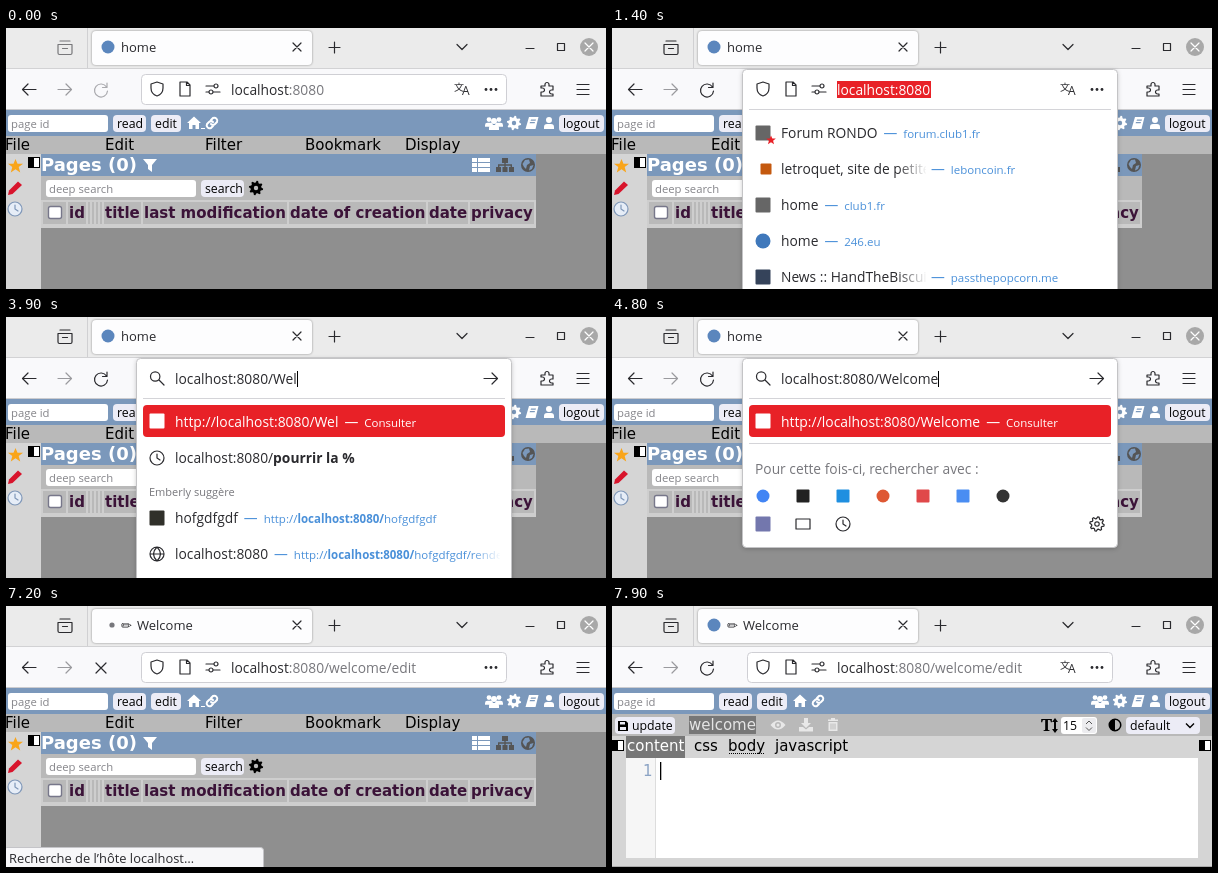
These frames come from a looping animation (600x261 px, 8 s). An HTML page:

```html
<!DOCTYPE html>
<html lang="en">
<head>
<meta charset="utf-8">
<title>Browser demo</title>
<style>
html, body { margin: 0; width: 100%; height: 100%; overflow: hidden; }
svg { display: block; width: 600px; height: 261px; }
text { white-space: pre; font-family: "Open Sans", "Noto Sans", sans-serif; }
.page { font-family: "DejaVu Sans", sans-serif; }
.bold { font-weight: bold; }
.popup { filter: drop-shadow(0 1px 2px #0003); }
.tab { filter: drop-shadow(0 0 1px #0006); }
</style>
</head>
<body>
<svg id="stage" viewBox="0 0 600 261"></svg>
<script>
const stage = document.getElementById('stage');
const LOOP = 8000, STEP = 100;
const INK = '#2a2a2e', GREY = '#77777c', LINK = '#4a90d9', RED = '#e82127';
const BLUE = '#7b98bb', MENU = '#b9b9b9', SIDE = '#d5d5d5';

const RING = 'M-7 0a7 7 0 1 0 14 0a7 7 0 1 0-14 0';
// Outline of a cog with eight teeth.
const COG = 'M' + Array.from({ length: 32 }, (_, i) => {
  const a = (i + .5) * Math.PI / 16, r = i % 4 < 2 ? 7.2 : 5.4;
  return `${(r * Math.cos(a)).toFixed(2)} ${(r * Math.sin(a)).toFixed(2)}`;
}).join('L') + 'Z';
const LINES = {
  view: 'M-5-6.5H5M-7-3H7V5.500Q7 7 5.500 7H-5.500Q-7 7-7 5.500ZM-2.500 1H2.500',
  cross: 'M-4-4L4 4M4-4L-4 4',
  stop: 'M-5-5L5 5M5-5L-5 5',
  plus: 'M-5.5 0H5.5M0-5.5V5.5',
  down: 'M-5-2.5L0 2.5L5-2.5',
  min: 'M-4 2H4',
  max: 'M-3.5-3.5H3.5V3.5H-3.5Z',
  back: 'M7 0H-6M-1-5.5L-6.5 0L-1 5.5',
  next: 'M-7 0H6M1-5.5L6.5 0L1 5.5',
  reload: 'M5.5-3A6.5 6.5 0 1 0 6.5 1M6-7V-2.5H1.5',
  shield: 'M0-7L6-5V-1Q6 5 0 7Q-6 5-6-1V-5Z',
  doc: 'M-5-7H2L5-4V7H-5ZM1.5-7V-3.5H5',
  perm: 'M-7-3H1M1-3a2 2 0 1 0 4 0a2 2 0 1 0-4 0M-7 3H-4M-4 3a2 2 0 1 0 4 0a2 2 0 1 0-4 0M0 3H7',
  search: 'M-6.5-1.5a4.7 4.7 0 1 0 9.4 0a4.7 4.7 0 1 0-9.4 0M2 2L7 7',
  clock: RING + 'M0-4V0L3 2',
  globe: RING + 'M-7 0H7M0-7Q-7 0 0 7Q7 0 0-7',
  menu: 'M-6-5H6M-6 0H6M-6 5H6',
  puzzle: 'M-6-3H-2V-4.5a2 2 0 0 1 4 0V-3H6V1H4.5a2 2 0 0 0 0 4H6V7H-6V3H-4.5a2 2 0 0 0 0-4H-6Z',
  link: 'M-1-3L1-5a3 3 0 0 1 4 4L3 1a3 3 0 0 1-4 0M1 3L-1 5a3 3 0 0 1-4-4L-3-1a3 3 0 0 1 4 0',
  tabs: 'M-7-5H7V5H-7Z',
  cog: COG + 'M-2.2 0a2.2 2.2 0 1 0 4.4 0a2.2 2.2 0 1 0-4.4 0'
};
const SOLIDS = {
  star: 'M0-7L2-2.3H7.5L3.2 1L4.7 6.5L0 3.3L-4.7 6.5L-3.2 1L-7.5-2.3H-2Z',
  pencil: 'M-7 7L-6 2.5L3-6.5L7-3L-2.5 6Z',
  house: 'M0-6.5L7 0H5V6H1.5V2H-1.5V6H-5V0H-7Z',
  funnel: 'M-7-6H7L2 0V7L-2 4V0Z',
  list: [-7, -2, 3].map(y => `M-9 ${y}h5v4h-5zM-3 ${y}h12v4h-12z`).join(''),
  tree: 'M-3-7H3V-2H-3ZM-9 2H-4V7H-9ZM-2.5 2H2.5V7H-2.5ZM4 2H9V7H4ZM-7-.7H7V.7H-7ZM-.7-2H.7V-.7H-.7ZM-.7 .7H.7V2H-.7ZM-7 .7H-5.6V2H-7ZM5.6 .7H7V2H5.6Z',
  earth: RING + 'M-5.5-1L-3-5L1-5.5L2-2L-1 0L-2 4L-4 2ZM2 1L5.5 0L4 4L1 5.5Z',
  book: 'M-3-6H6.5L3.5 6H-6.5ZM-1-3.5L-1.4-2.3H3.6L4-3.5ZM-2-1L-2.4 .2H2.6L3-1Z',
  user: 'M-3-3a3 3 0 1 0 6 0a3 3 0 1 0-6 0M-5 6V4Q-5 1-2 1H2Q5 1 5 4V6Z',
  trash: 'M-5-5.5H-2V-7H2V-5.5H5V-4H-5ZM-4.5-3H4.5V6H-4.5ZM-2.5-1.5V4.5H-1.5V-1.5ZM-.5-1.5V4.5H.5V-1.5ZM1.5-1.5V4.5H2.5V-1.5Z',
  save: 'M-5-5H3L5-3V5H-5ZM-3-4V-1.5H2V-4ZM-3 1V4H3V1Z',
  load: 'M-2-7H2V-2H5L0 3L-5-2H-2ZM-7 2H-3L0 4.5L3 2H7V6.5H-7Z',
  eye: 'M-7.5 0Q0-9 7.5 0Q0 9-7.5 0ZM-3 0a3 3 0 1 0 6 0a3 3 0 1 0-6 0M-1.5 0a1.5 1.5 0 1 0 3 0a1.5 1.5 0 1 0-3 0',
  contrast: 'M-6.5 0a6.5 6.5 0 1 0 13 0a6.5 6.5 0 1 0-13 0M0-5A5 5 0 0 1 0 5Z',
  cog: COG + 'M-2.2 0a2.2 2.2 0 1 0 4.4 0a2.2 2.2 0 1 0-4.4 0',
  arrow: 'M0 0V15L3.5 12L6 17.5L8.5 16.5L6 11H11Z'
};

const text = (x, y, size, fill, str, cls = '') =>
  `<text x="${x}" y="${y}" font-size="${size}" fill="${fill}" class="${cls}">${str}</text>`;
const page = (x, y, str, fill = '#000') => text(x, y, 15, fill, str, 'page');
const rect = (x, y, w, h, fill, r = 0, more = '') =>
  `<rect x="${x}" y="${y}" width="${w}" height="${h}" rx="${r}" fill="${fill}" ${more}/>`;
const dot = (x, y, r, fill) => `<circle cx="${x}" cy="${y}" r="${r}" fill="${fill}"/>`;
const square = (x, y, size, fill) => rect(x - size / 2, y - size / 2, size, size, fill, 1);
const line = (name, x, y, color = INK, w = 1.2) =>
  `<path transform="translate(${x} ${y})" d="${LINES[name]}" fill="none" stroke="${color}" stroke-width="${w}" stroke-linejoin="round" stroke-linecap="round"/>`;
const solid = (name, x, y, fill, scale = 1) =>
  `<path transform="translate(${x} ${y}) scale(${scale})" d="${SOLIDS[name]}" fill="${fill}" fill-rule="evenodd"/>`;
const half = (x, y) => rect(x + .5, y + .5, 11, 10, '#fff', 0, 'stroke="#000"') + rect(x, y, 6, 11, '#000');
const button = (x, w, y, str) => rect(x, y, w, 17, '#ececf6', 4) + text(x + 4, y + 13, 12.3, '#000', str);
const field = (x, w, y, str) => rect(x, y, w, 17, '#fff', 3) + text(x + 3, y + 13, 11.3, '#85858a', str);

function chrome(s) {
  const tone = s.active ? INK : '#77777a';
  let out = rect(0, 0, 600, 41, '#ebebeb') + rect(0, 40, 600, 42, '#f9f9fb') + rect(0, 40, 600, 1, '#d2d2d4') +
    line('view', 59, 19.5, tone) + rect(81, 0, 1, 40, '#d0d0d2') +
    `<g class="tab">${rect(86, 3, 220, 34, '#fdfdfe', 4)}</g>`;
  out += s.loading ? dot(106, 19, 2.6, '#77777c') : dot(102, 19, 6.5, '#5b86bd');
  out += s.welcome
    ? text(115, 24, 13, INK, '✏', 'page') + text(131, 24, 13, INK, 'Welcome')
    : text(115, 24, 13, INK, 'home');
  out += line('cross', 291, 19) + line('plus', 328.5, 19.5) + line('down', 456, 19) +
    line('min', 524, 18.5) + line('max', 555, 19) +
    dot(583, 19, 9, '#a8a8a8') + line('cross', 583, 19, '#fff');
  out += line('back', 23, 61.5) + line('next', 59, 61.5, '#9a9a9e') +
    (s.loading ? line('stop', 95, 62) : line('reload', 95, 62, s.reloadable ? INK : '#aaaaae')) +
    line('puzzle', 541, 61) + line('menu', 577, 61.5);
  return out + rect(135.5, 46.5, 365, 30, '#fff', 4, 'stroke="#cfcfd4"') + badges(!s.loading) +
    text(225, 67, 13.8, INK, `localhost<tspan fill="${GREY}">:8080${s.path}</tspan>`) +
    rect(0, 81, 600, 1, '#cccccf');
}

const badges = translate => line('shield', 151, 61) + line('doc', 179, 61) + line('perm', 207, 61) +
  (translate ? text(448, 63, 10, INK, '文') + text(456, 67, 12, INK, 'A') : '') +
  [480, 485, 490].map(x => dot(x, 61.5, 1.4, INK)).join('');

const topBar = () => rect(0, 82, 600, 26, BLUE) + field(2, 100, 87, 'page id') +
  button(107, 33, 87, 'read') + button(145, 30, 87, 'edit') +
  solid('house', 188, 95, '#fff') + line('link', 206, 95, '#fff', 2) +
  solid('user', 483, 94, '#fff', .8) + solid('user', 493, 94, '#fff', .8) + solid('user', 488, 96, '#fff') +
  solid('cog', 508, 95, '#fff') + solid('book', 526, 95, '#fff') + solid('user', 543, 95, '#fff') +
  button(553, 45, 87, 'logout');

function homePage() {
  let out = rect(0, 82, 600, 179, '#8f8f8f') + topBar() + rect(195, 100, 4, 1, '#fff') +
    rect(0, 108, 600, 18, MENU) +
    ['File', 'Edit', 'Filter', 'Bookmark', 'Display'].map((s, i) => page(i * 100 - 1, 122, s)).join('');
  out += rect(0, 126, 35, 135, SIDE) + solid('star', 9.5, 138, '#f9a51a') + half(22, 129) +
    solid('pencil', 9, 160, '#d8142c') + dot(9, 181, 7, '#e6edf7') + line('clock', 9, 181, '#7f97b8');
  out += rect(35, 126, 495, 22, BLUE) + text(35, 143, 18, '#fff', 'Pages (0)', 'page bold') +
    solid('funnel', 144, 137, '#fff') + solid('list', 475, 137, '#fff') +
    solid('tree', 499, 137, '#555') + solid('earth', 522, 137, '#555');
  out += rect(35, 148, 495, 24, MENU) + field(40, 150, 152, 'deep search') + button(195, 43, 152, 'search') +
    solid('cog', 250, 160, '#000') + rect(35, 172, 495, 28, '#cecece');
  const cells = [[37, 23, ''], [62, 18, 'id'], [82, 2, ''], [86, 2, ''], [90, 2, ''], [94, 2, ''], [98, 37, 'title'],
    [137, 144, 'last modification'], [283, 137, 'date of creation'], [422, 40, 'date'], [464, 64, 'privacy']];
  for (const [x, w, s] of cells)
    out += rect(x, 174, w, 22, MENU) + text(x + 1, 190, 15, '#3b1338', s, 'page bold');
  return out + rect(42.5, 178.5, 13, 12, '#fff', 2, 'stroke="#77778a" stroke-width="1.4"');
}

function editPage(caret) {
  const pale = '#e8e8e8';
  let out = rect(0, 82, 600, 179, SIDE) + topBar() + rect(0, 108, 600, 22, MENU) +
    rect(3, 111, 60, 17, '#ececf6', 4) + solid('save', 11, 120, '#000') + text(20, 124, 12.3, '#000', 'update') +
    rect(77, 110, 67, 18, '#777') + page(77, 124, 'welcome', '#e4e4e4') +
    solid('eye', 166, 119, pale) + solid('load', 194, 119, pale) + solid('trash', 221, 119, pale);
  out += `<text x="429" y="125" font-size="17" style="font-family:'Noto Serif',serif;font-weight:bold">T</text>` +
    '<path d="M443 112l3 4h-2v7h2l-3 4l-3-4h2v-7h-2z"/>' +
    rect(449, 111, 36, 17, '#fff', 3) + text(451, 124, 12.3, '#000', '15') + rect(470, 112, 14, 15, '#ececef', 2) +
    '<path d="M474 118l3-3l3 3M474 121.500l3 3l3-3" fill="none" stroke="#555"/>' +
    solid('contrast', 503, 119, '#000') + rect(514, 111, 74, 17, '#ececf6', 4) +
    text(518, 124, 12.3, '#000', 'default') + '<path d="M574 117.500l4 4l4-4" fill="none" stroke="#000" stroke-width="1.4"/>';
  out += half(0, 134) + half(587, 134) + rect(14, 130, 59, 22, '#777') + page(15, 145, 'content', '#fff') +
    page(82, 145, 'css') + page(116, 145, 'body') + page(163, 145, 'javascript') +
    '<path d="M117 147.500H153" stroke="#000" stroke-dasharray="1 1"/>';
  return out + rect(14, 152, 572, 100, '#fff') + rect(14, 152, 30, 100, '#f6f6f6') + rect(43, 152, 1, 100, '#ddd') +
    page(31, 170, '1', '#8ba3c4') + (caret ? rect(48, 156, 1.3, 18, '#000') : '') + rect(0, 260, 600, 1, '#aaa');
}

const note = str => `—<tspan dx="6" font-size="11.5">${str}</tspan>`;
const row = (y, title, url, urlX) => {
  if (!urlX) return text(169, y + 5, 13.8, INK, `${title}<tspan fill="${LINK}" dx="6">${note(url)}</tspan>`);
  return text(169, y + 5, 13.8, INK, title) + rect(285, y - 12, 30, 24, 'url(#fade)') +
    rect(314, y - 12, 185, 24, '#fff') + text(urlX, y + 5, 13.8, LINK, note(url));
};

// Rows of frequently visited places; "from" skips the rows already replaced.
const topSites = from => [
  () => square(151, 105, 15, '#666') + solid('star', 159, 112, RED, .65) + row(105, 'Forum RONDO', 'forum.club1.fr'),
  () => square(154, 141, 11, '#c4590f') + row(141, 'letroquet, site de petites', 'leboncoin.fr', 319),
  () => square(151, 177, 15, '#666') + row(177, 'home', 'club1.fr'),
  () => dot(151, 213, 7.5, '#3f78bb') + row(213, 'home', '246.eu'),
  () => square(151, 249, 15, '#35435a') + row(249, 'News :: HandTheBiscuit', 'passthepopcorn.me', 319)
].slice(from).map(f => f()).join('');

const visitRow = title => rect(137, 88, 362, 32, RED, 4) + square(151, 104, 15, '#fff') +
  text(169, 110, 13.9, '#fff', `${title}<tspan dx="6">${note('Consulter')}</tspan>`);

const history = () => line('clock', 151, 141) +
  text(169, 146, 13.8, INK, 'localhost:8080/<tspan class="bold">pourrir la %</tspan>') +
  text(143, 179, 11, GREY, 'Emberly suggère') + square(151, 201, 15, '#30302a') +
  row(201, 'hofgdfgdf', 'http://<tspan class="bold">localhost:8080/</tspan>hofgdfgdf') + line('globe', 151, 237) +
  row(237, 'localhost:8080', 'http://<tspan class="bold">localhost:8080/</tspan>hofgdfgdf/render') +
  rect(465, 225, 30, 24, 'url(#fade)') + rect(494, 225, 11, 24, '#fff');

function engines() {
  const colors = ['#4285f4', '#222', '#1f8fe0', '#de5833', '#e0484a', '#4a8df2', '#333'];
  return rect(137, 126, 362, 1, '#d4d4d8') +
    text(143, 157, 13.8, GREY, 'Pour cette fois-ci, rechercher avec :') +
    colors.map((c, i) => (i % 3 ? square(151 + 40 * i, 179, 13, c) : dot(151 + 40 * i, 179, 6.5, c))).join('') +
    square(151, 207, 15, '#7377ad') + line('tabs', 191, 207) + line('clock', 231, 207) + line('cog', 485, 207);
}

const KEYS = [[2800, '/'], [3500, '/W'], [3700, '/We'], [3900, '/Wel'], [4100, '/Welc'], [4200, '/Welco'],
  [4400, '/Welcom'], [4700, '/Welcome'], [5800, '/Welcome/'], [6000, '/Welcome/a'], [6300, '/Welcome/ad'], [6500, '/Welcome/add']];
const typed = t => KEYS.reduce((s, [at, str]) => t >= at ? str : s, '');

function popup(t) {
  const short = t >= 4800, path = typed(t);
  let out = `<g class="popup">${rect(130.5, 41.5, 375, short ? 189 : 240, '#fff', 4, 'stroke="#c4c4c6"')}</g>` +
    rect(137, 81, 362, 1, '#d4d4d8');
  if (path) {
    out += line('search', 151, 61) + line('next', 485, 61.5) +
      `<text id="typed" x="169" y="67" font-size="13.8" fill="${INK}">localhost:8080${path}</text>` +
      rect(0, 54, 1, 16, '#000', 0, 'id="caret"');
  } else {
    const marked = t < 1600;
    out += badges(true) + (marked ? rect(225, 53, 94, 17, RED) : '') +
      text(225, 67, 13.8, marked ? '#fff' : INK, 'localhost:8080') +
      (!marked && t < 2300 ? rect(318, 54, 1, 16, '#000') : '');
  }
  if (t < 2900) return out + topSites(0);
  out += visitRow((t < 3500 ? '' : 'http://') + 'localhost:8080' + path);
  return out + (short ? engines() : t < 3000 ? topSites(1) : history());
}

function pointer(t) {
  if (t < 100 || t >= 1400) return '';
  const u = Math.min(1, (t - 100) / 800), ease = u * u * (3 - 2 * u);
  const v = Math.max(0, (t - 1100) / 300);
  const x = 124 + 230 * ease + 220 * v, y = 2 + 56 * ease - 75 * v;
  return y > 46
    ? `<path transform="translate(${x} ${y})" d="M-3-7.500H-1L0-6.500L1-7.500H3M0-6.500V6.500M-3 7.500H-1L0 6.500L1 7.500H3" fill="none" stroke="#000" stroke-width="1.6"/>`
    : `<path transform="translate(${x} ${y})" d="${SOLIDS.arrow}" stroke="#fff"/>`;
}

const status = () => rect(-2, 241.5, 259.5, 24, '#f7f7f9', 3, 'stroke="#c4c4c8"') +
  text(3, 257, 12.9, INK, 'Recherche de l’hôte localhost…');

function draw(t) {
  const editing = t >= 7500;
  const state = {
    active: t >= 1100,
    loading: t >= 7000 && t < 7800,
    reloadable: t >= 1100 && t < 7000 || t >= 7900,
    welcome: t >= 7200,
    path: t < 7000 ? '' : t < 7100 ? '/Welcome/add' : '/welcome/edit'
  };
  stage.innerHTML = '<defs><linearGradient id="fade"><stop stop-color="#fff" stop-opacity="0"/>' +
    '<stop offset="1" stop-color="#fff"/></linearGradient></defs>' +
    chrome(state) + (editing ? editPage(t >= 7700) : homePage()) +
    (t >= 1100 && t < 7000 ? popup(t) : '') + (t >= 7100 && !editing ? status() : '') + pointer(t);
  const input = document.getElementById('typed');
  if (input) document.getElementById('caret').setAttribute('x', Math.round(169 + input.getComputedTextLength()));
}

let last = -1;
function tick() {
  const now = Math.floor(performance.now() % LOOP / STEP) * STEP;
  if (now !== last) draw(last = now);
  requestAnimationFrame(tick);
}
tick();
</script>
</body>
</html>
```
